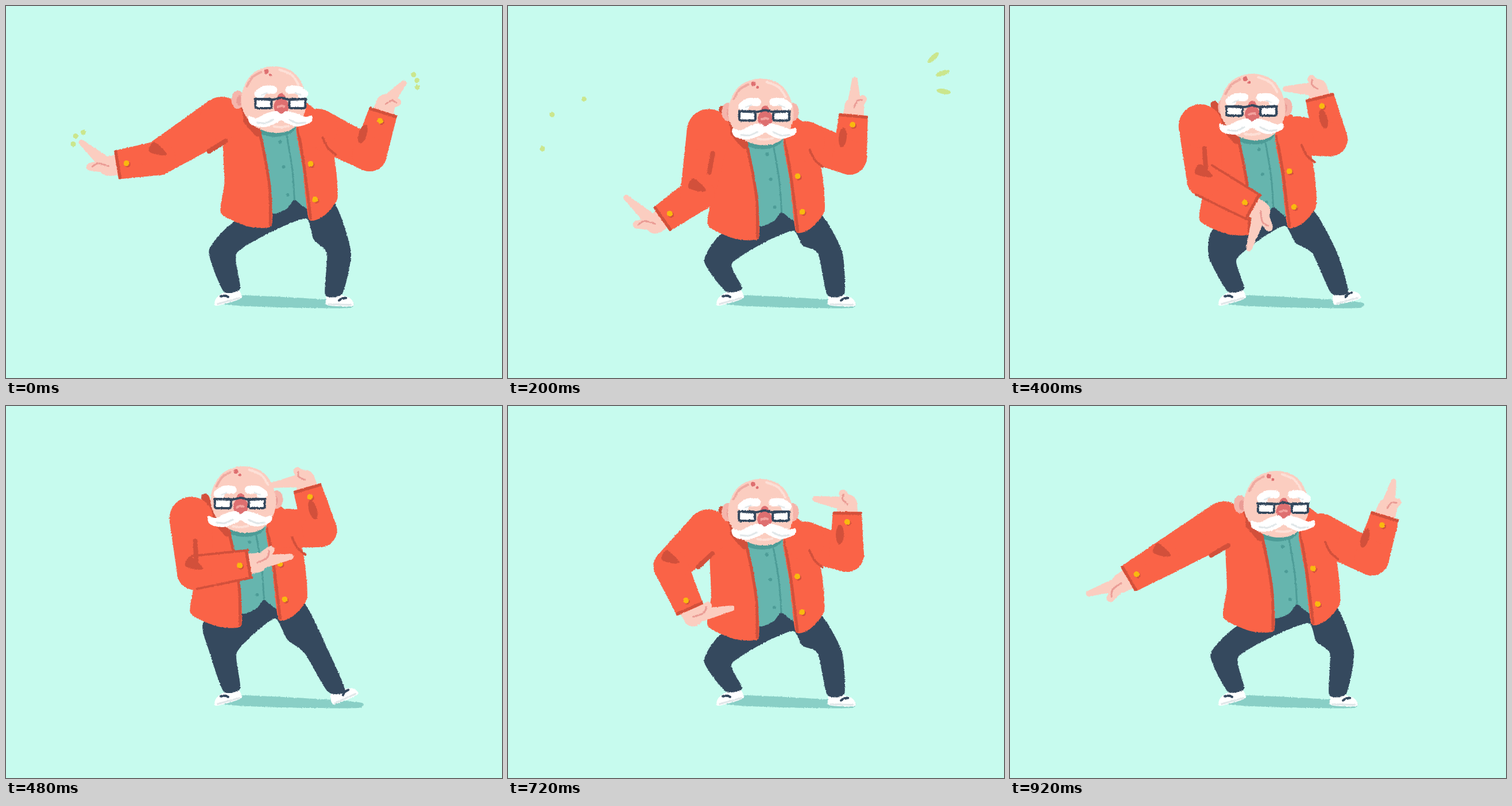
Animation, 864 px wide and 648 px high, one loop 960 ms. Source, as an HTML page with a canvas:

```html
<!DOCTYPE html>
<html lang="en">
<head>
<meta charset="utf-8">
<title>Dancing man</title>
<style>
  html, body { margin: 0; width: 100%; height: 100%; overflow: hidden; background: #c7fbee; }
  canvas { display: block; filter: url(#rough); }
  svg { position: absolute; width: 0; height: 0; }
</style>
</head>
<body>
<svg><filter id="rough" x="0" y="0" width="1" height="1" color-interpolation-filters="sRGB">
  <feTurbulence type="fractalNoise" baseFrequency=".4" numOctaves="2" seed="4"/>
  <feDisplacementMap in="SourceGraphic" scale="3" xChannelSelector="R" yChannelSelector="G"/>
</filter></svg>
<canvas id="stage" width="864" height="648"></canvas>
<script>
const ctx = document.getElementById('stage').getContext('2d');
const LOOP = 960, STEP = 40, RAD = Math.PI / 180;
const RED = '#fa6347', RED_DARK = '#d2503b', TEAL = '#66b5ae', TEAL_DARK = '#4d9c97', NAVY = '#35495e',
  SKIN = '#fbcdc0', SKIN_DARK = '#ea9c95', NOSE = '#de6f70', SHADOW = '#89cfc6', GOLD = '#f9b90f',
  LIME = '#cbe68d', GREY = '#e1e7e9';

// Key points of the swinging arm: time, elbow, wrist, then the pointing angles of both hands.
const SWING = [
  [0, 265, 265, 192, 277, 213, -54],
  [200, 330, 328, 267, 372, 212, -88],
  [300, 332, 318, 335, 380, 108, -128],
  [400, 338, 303, 425, 351, 97, -168],
  [480, 328, 290, 425, 275, -10, -177],
  [640, 294, 283, 362, 331, -33, -161],
  [800, 275, 275, 270, 367, 45, -149],
  [920, 265, 267, 205, 302, 160, -76]
];

// Looping Hermite interpolation between key rows.
function tween(rows, t) {
  const n = rows.length, i = rows.findLastIndex(row => row[0] <= t);
  const [a, b, c, d] = [i - 1, i, i + 1, i + 2].map(j => {
    const lap = Math.floor(j / n), [time, ...rest] = rows[j - lap * n];
    return [time + lap * LOOP, ...rest];
  });
  const h = c[0] - b[0], u = (t - b[0]) / h;
  return b.slice(1).map((p, k) => {
    const q = c[k + 1];
    const m0 = .8 * h * (q - a[k + 1]) / (c[0] - a[0]), m1 = .8 * h * (d[k + 1] - p) / (d[0] - b[0]);
    return p + (q - p) * u * u * (3 - 2 * u) + m0 * u * (1 - u) ** 2 - m1 * u * u * (1 - u);
  });
}

const add = (p, x, y) => [p[0] + x, p[1] + y];
const mix = (a, b, k) => [a[0] + (b[0] - a[0]) * k, a[1] + (b[1] - a[1]) * k];
const polar = (p, angle, r) => add(p, Math.cos(angle) * r, Math.sin(angle) * r);
const heading = (a, b) => Math.atan2(b[1] - a[1], b[0] - a[0]);
const clamp = v => Math.max(0, Math.min(1, v));

function trace(pts, closed, round) {
  const n = pts.length, at = i => closed ? pts[(i + n) % n] : pts[Math.max(0, Math.min(n - 1, i))];
  ctx.beginPath();
  ctx.moveTo(...pts[0]);
  for (let i = 0; i < n - !closed; i++) {
    const [a, b, c, d] = [at(i - 1), at(i), at(i + 1), at(i + 2)];
    ctx.bezierCurveTo(b[0] + (c[0] - a[0]) * round, b[1] + (c[1] - a[1]) * round,
      c[0] - (d[0] - b[0]) * round, c[1] - (d[1] - b[1]) * round, ...c);
  }
}
function blob(color, pts, round = .1) {
  trace(pts, true, round);
  ctx.fillStyle = color;
  ctx.fill();
}
function line(color, width, pts) {
  trace(pts, false, .16);
  ctx.strokeStyle = color;
  ctx.lineWidth = width;
  ctx.stroke();
}
function oval(color, [x, y], rx, ry = rx, angle = 0) {
  ctx.beginPath();
  ctx.ellipse(x, y, rx, ry, angle, 0, 7);
  ctx.fillStyle = color;
  ctx.fill();
}
function group(x, y, draw) {
  ctx.save();
  ctx.translate(x, y);
  draw();
  ctx.restore();
}

// Tapered bar from a to b, round at a and optionally at b.
function limb(color, a, b, ra, rb, capped = true) {
  const side = heading(a, b) + Math.PI / 2;
  blob(color, [polar(a, side, ra), polar(b, side, rb), polar(b, side, -rb), polar(a, side, -ra)], 0);
  oval(color, a, ra);
  if (capped) oval(color, b, rb);
}
function button(p) {
  oval(RED_DARK, add(p, 2, 2), 5);
  oval(GOLD, p, 5);
}

function hand(elbow, wrist, angle, spread, reach, curl) {
  const palm = polar(wrist, heading(elbow, wrist), 13), tip = polar(wrist, angle, reach);
  const second = polar(palm, angle + spread, curl);
  limb(SKIN, wrist, palm, 18, 17);
  limb(SKIN, palm, second, 12, 7);
  limb(SKIN, palm, tip, 13, 5);
  line(SKIN_DARK, 3, [mix(palm, second, .9), polar(palm, angle + spread / 2, curl * .6), palm]);
}

function sleeve(shoulder, elbow, wrist, radius) {
  limb(RED, shoulder, elbow, radius, 30);
  limb(RED, elbow, wrist, 30, 25, false);
  const fore = heading(elbow, wrist), side = fore + Math.PI / 2;
  const cuff = polar(wrist, fore, -3);
  line(RED_DARK, 5, [polar(cuff, side, 23), polar(cuff, side, -23)]);
  button(polar(wrist, fore, -18));
}

function shoe(x, y, tilt, flip) {
  group(x, y, () => {
    ctx.rotate(tilt * RAD);
    ctx.scale(flip, 1);
    blob('#fff', [[-24, 5], [-20, -9], [0, -10], [18, -5], [25, 4], [20, 9], [-18, 10]], .16);
    line(GREY, 3, [[-19, 8], [0, 7], [20, 6]]);
    line(NAVY, 4, [[-1, 0], [4, -4], [11, -5]]);
  });
}

// The knees follow the body while the feet stay planted; the right foot rolls on its heel.
function legs(x, y) {
  const roll = clamp((440 - x) / 27);
  const kneeL = [378 - .55 * (y - 164), 429 + .85 * (y - 164)], kneeR = [541 + .73 * (x - 413), 431];
  const ankleL = [393, 495], ankleR = [571 + 5 * roll, 503 - 5 * roll];
  const crotch = [x + 56, y + 207], innerL = add(kneeL, 23, 3), innerR = add(kneeR, -21, 0);
  blob(SHADOW, [[372, 518], [410, 504], [555, 511], [604 + 16 * roll, 517], [598 + 16 * roll, 526], [520, 526], [420, 523]]);
  shoe(386, 507, -18, -1);
  shoe(581 + 7 * roll, 513 - 10 * roll, 4 - 26 * roll, 1);
  blob(NAVY, [
    [x - 68, y + 212], add(kneeL, -25, -2), add(ankleL, -14, 2), add(ankleL, 15, -3), innerL,
    add(mix(innerL, crotch, .5), 0, -7), crotch, add(mix(crotch, innerR, .5), -5, 6), innerR,
    add(ankleR, -15, 0), add(ankleR, 15, -2), add(kneeR, 21, -3), [x + 104, y + 178], [x + 36, y + 168]
  ]);
}

// Shirt and open jacket, relative to the middle of the head.
function torso() {
  const notch = [36, 174];
  blob(TEAL, [[-30, 40], [39, 45], [60, 188], notch, [23, 190], [-4, 197], [-14, 100]], .07);
  oval(TEAL_DARK, [2, 46], 36, 19);
  line(TEAL_DARK, 3, [[22, 60], [32, 120], notch]);
  for (const k of [0, .47, 1]) oval(TEAL_DARK, mix([11, 74], [24, 166], k), 3);

  const lapel = [[-63, -8], [-48, 25], [-24, 54], [-14, 100], [-5, 158], [-4, 220]];
  blob(RED, [...lapel, [-45, 221], [-92, 198], [-86, 145], [-88, 60]]);
  line(RED_DARK, 13, lapel.slice(0, 3).map(p => add(p, -4, 4)));
  line(RED_DARK, 5, lapel.slice(2).map(p => add(p, -2, -2)));
  const front = [[54, 5], [39, 52], [50, 118], [61, 208]];
  blob(RED, [...front, [88, 202], [111, 172], [107, 110], [92, 40]]);
  line(RED_DARK, 5, front.slice(1).map(p => add(p, 3, -1)));
  for (const p of [[52, 60], [64, 112], [72, 174]]) button(p);
}

function face(turn) {
  for (const ear of [-50 - turn, 58 - 2 * Math.max(0, turn - 6)]) {
    oval('#f5b5ab', [ear, 0], 11, 16);
    oval(SKIN_DARK, [ear - 3 * Math.sign(ear), 2], 5, 9);
  }
  blob(SKIN, [[0, -58], [36, -46], [55, -12], [54, 22], [34, 50], [2, 58], [-32, 47], [-54, 18], [-55, -14], [-36, -46]], .17);
  line('#efaaa1', 4, [[-47, -23], [-37, -39], [-22, -48]]);
  line('#fde0d7', 4, [[10, -52], [31, -43], [43, -26]]);
  oval(NOSE, [-13, -49], 4);
  oval(NOSE, [-6, -43], 2.5);
  ctx.translate(turn, 0);
  oval(NOSE, [0, 1], 8, 12);
  oval(NOSE, [0, 12], 13, 14);
  line('#f2a29e', 4, [[-6, 13], [0, 11], [5, 12]]);
  blob('#fff', [[-57, 29], [-43, 32], [-26, 24], [-9, 20], [0, 25], [9, 20], [26, 24], [42, 30], [53, 28],
    [52, 39], [28, 47], [9, 41], [0, 36], [-9, 41], [-30, 48], [-53, 43]], .17);
  line('#fde0d7', 4, [[-13, 47], [0, 48], [13, 46]]);
  for (const side of [-1, 1]) {
    line(GREY, 3, [[side * 42, 40], [side * 28, 41], [side * 14, 35]]);
    line('#fff', 14, [[side * 40, -10], [side * 29, -17], [side * 14, -17]]);
    oval('#fff', [side * 36, -9], 8, 7);
    line(GREY, 2, [[side * 34, -8], [side * 24, -12]]);
    ctx.beginPath();
    ctx.roundRect(side < 0 ? -45 : 14, -1, 28, 16, 3);
    ctx.fillStyle = '#fff';
    ctx.fill();
    ctx.strokeStyle = NAVY;
    ctx.lineWidth = 4;
    ctx.stroke();
  }
  line(NAVY, 4, [[-46, -1], [-15, 0], [0, -3], [14, 0], [43, -1]]);
}

// Three drops flying out from a fingertip like a fan.
function sparks(tip, first, gap, near, far, progress, length) {
  for (let i = 0; i < 3; i++) {
    const angle = (first + i * gap) * RAD;
    oval(LIME, polar(tip, angle, near + (far - near) * progress), length, 4.5, angle);
  }
}

function draw(t) {
  const a = t / LOOP * 2 * Math.PI, sway = Math.cos(a);
  const x = 440 + 20 * sway + 6.5 * Math.cos(3 * a), y = 163 + 22 * Math.abs(Math.sin(a)) ** .75;
  const [ex, ey, wx, wy, angleL, angleR] = tween(SWING, t);
  const shoulderL = [x - 91, y + 33], elbowL = [ex, ey], wristL = [wx, wy];
  const shoulderR = [x + 77, y + 50], elbowR = [x + 150 + 17 * sway, y + 74 + 21 * sway];
  const wristR = add(elbowR, 1 + 23 * sway, -75);

  ctx.clearRect(0, 0, 864, 648);
  legs(x, y);
  hand(elbowR, wristR, angleR * RAD, .8, 60, 20);
  group(x, y, torso);

  sleeve(shoulderR, elbowR, wristR, 34);
  line(RED_DARK, 4, [[x + 85, y + 66], [x + 94, y + 84], [x + 108, y + 96]]);
  oval(RED_DARK, add(elbowR, -12, -35), 17, 7, heading(elbowR, wristR));

  hand(elbowL, wristL, angleL * RAD, -.6, 72, 32);
  sleeve(shoulderL, elbowL, wristL, 38);
  const pit = [x - 84, y + 72], upper = heading(shoulderL, elbowL), side = heading(elbowL, wristL) + Math.PI / 2;
  line(RED_DARK, 8, [pit, polar(pit, upper, 34)]);
  group(...elbowL, () => blob(RED_DARK, [[-7, -28], [15, -8], [4, -5], [-16, -12]], .15));
  // Edge lines show only while the forearm crosses the jacket.
  ctx.globalAlpha = clamp((wx - shoulderL[0]) / 60);
  for (const r of [-1, 1]) line(RED_DARK, 4, [polar(elbowL, side, 29 * r), polar(wristL, side, 24 * r)]);
  ctx.globalAlpha = 1;
  group(x, y, () => face(Math.min(13, (x - 424) * .45)));

  const p = t / 200;
  if (t <= 200) sparks([135, 238], 172, 48, 18, 76, 1 - (1 - p) ** 2, 4.5 + 8 * Math.sin(Math.PI * p));
  if (t <= 280) sparks([692, 137], -44, 27, 25, 68, p, 4.5 + 8 * Math.min(1, p));
}

ctx.lineCap = ctx.lineJoin = 'round';
function tick() {
  draw(Math.floor(performance.now() % LOOP / STEP) * STEP);
  requestAnimationFrame(tick);
}
tick();
</script>
</body>
</html>
```
